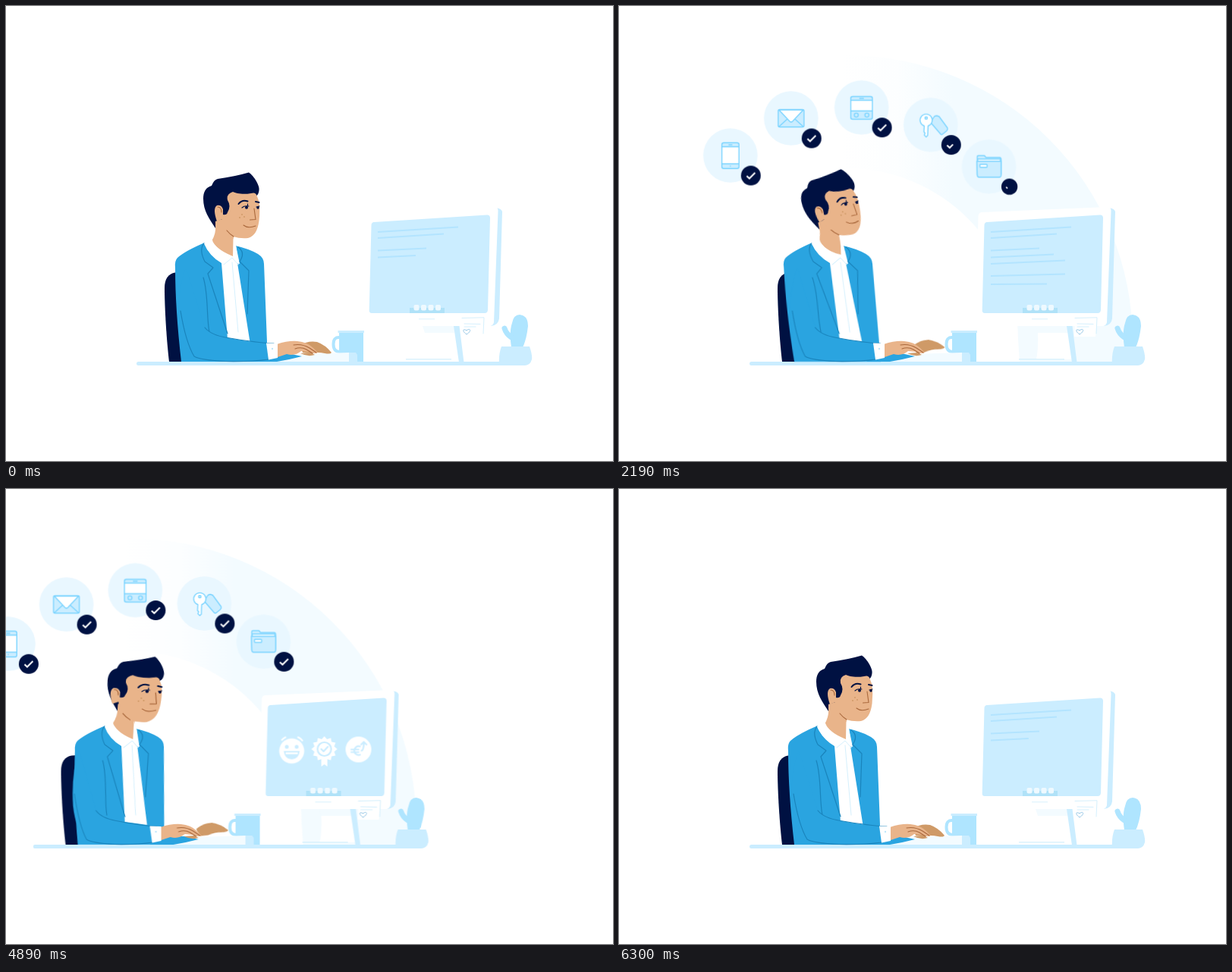
An HTML page that plays this animation: 800x600 px, repeating every 6330 ms.

```html
<!DOCTYPE html>
<html lang="en">
<head>
<meta charset="utf-8">
<title>At the desk</title>
<style>
html, body { margin: 0; width: 100%; height: 100%; overflow: hidden; background: #fff; }
svg { display: block; width: 800px; height: 600px; }

.navy { fill: #001142; }
.blue { fill: #2aa4e0; }
.skin { fill: #e9b48a; }
.tan { fill: #cf9a67; }
.pale { fill: #cbedff; }
.sky { fill: #afe5ff; }
.mist { fill: #f3fbff; }
.white { fill: #fff; }
.seam, .crease, .brow, .text path, .thin, .cut { fill: none; stroke-linecap: round; stroke-linejoin: round; }
.seam { stroke: #1a84bc; stroke-width: 1.2; }
.crease { stroke: #a9683c; stroke-width: 1.1; }
.brow { stroke: #001142; stroke-width: 2; }
.thin { stroke: #d5f0fd; stroke-width: 1; }
.cut { stroke: #cbedff; stroke-width: 2.2; }
.glyph { fill: #cbedff; stroke: #7dd5ff; stroke-width: 1.4; stroke-linejoin: round; }
.glyph .white { fill: #fff; }

/* every loop below lasts one full cycle */
.track, .arc, .torso, .head, .face, .sleeve, .hand, .far, .text, .text .new, .text .half, .badge, .tick, .pop {
  animation: 6330ms linear infinite both;
}
.track { animation-name: slide; }
.arc { opacity: 0; animation-name: arc; }
.torso { transform-origin: 0 469px; animation-name: lean; animation-timing-function: ease-in-out; }
.head { transform-origin: 285px 318px; animation-name: nod; animation-timing-function: ease-in-out; }
.face { transform-origin: 345px 0; animation-name: turn; animation-timing-function: ease-in-out; }
.sleeve { transform-origin: 200px 0; animation-name: sleeve; animation-timing-function: ease-in-out; }
.hand { animation-name: hand; animation-timing-function: ease-in-out; }
.far { transform-origin: 395px 452px; animation-name: far; animation-timing-function: ease-in-out; }
.text { animation-name: clear; }
.text path { stroke: #b3e4ff; stroke-width: 2; stroke-linecap: butt; }
.text .new { stroke-dasharray: 1 2; stroke-dashoffset: 1; animation-name: type; }
.text .half { stroke-dasharray: 1 2; stroke-dashoffset: .4; animation-name: finish; }
.badge { transform: scale(0); animation-name: badge; }
.tick { fill: none; stroke: #fff; stroke-width: 2; stroke-dasharray: 1 2; stroke-dashoffset: 1; animation-name: tick; }
.pop { transform: scale(0); animation-name: pop; }
.still, .still * { animation: none !important; }

@keyframes slide {
  0%, 68.2% { transform: translateX(0); animation-timing-function: cubic-bezier(.65, 0, .35, 1); }
  96.4%, 100% { transform: translateX(-1010px); }
}
@keyframes arc { 0%, 7% { opacity: 0; } 15%, 100% { opacity: 1; } }
@keyframes lean {
  0%, 20.5% { transform: skewX(0deg); }
  31.6%, 37.9% { transform: skewX(2.65deg); }
  47.4%, 100% { transform: skewX(-2deg); }
}
@keyframes nod {
  0% { transform: rotate(0deg); }
  9% { transform: rotate(1.5deg); }
  18.5%, 20.5% { transform: rotate(2.5deg); }
  31.6%, 37.9% { transform: rotate(-9deg); }
  47.4%, 64% { transform: rotate(4deg); }
  77%, 100% { transform: rotate(2.5deg); }
}
@keyframes turn {
  0%, 37.9% { transform: scaleX(1); }
  47.4%, 100% { transform: scaleX(1.14); }
}
@keyframes sleeve {
  0% { transform: scaleX(1); }
  18.5%, 20.5% { transform: scaleX(1.014); }
  31.6%, 37.9% { transform: scaleX(.945); }
  47.4%, 100% { transform: scaleX(.886); }
}
@keyframes hand {
  0% { transform: translateX(0); }
  18.5%, 20.5% { transform: translateX(2px); }
  31.6%, 37.9% { transform: translateX(-8px); }
  47.4%, 100% { transform: translateX(-17px); }
}
@keyframes far {
  0%, 6%, 12% { transform: rotate(0deg); }
  3%, 9%, 15% { transform: rotate(-8deg); }
  18.5% { transform: translateX(-4px) rotate(0deg); }
  24%, 100% { transform: rotate(-12deg); }
}
@keyframes clear { 0%, 37.5% { opacity: 1; } 40%, 100% { opacity: 0; } }
@keyframes type {
  0% { stroke-dashoffset: 1; }
  9.8%, 60% { stroke-dashoffset: 0; }
  60.1%, 100% { stroke-dashoffset: 1; }
}
@keyframes finish { 0% { stroke-dashoffset: .4; } 3.3%, 100% { stroke-dashoffset: 0; } }
@keyframes badge {
  0%, 25.28% { transform: scale(0); animation-timing-function: ease-out; }
  30%, 86% { transform: scale(1); }
  86.1%, 100% { transform: scale(0); }
}
@keyframes tick {
  0%, 27.6% { stroke-dashoffset: 1; }
  30.8%, 86% { stroke-dashoffset: 0; }
  86.1%, 100% { stroke-dashoffset: 1; }
}
@keyframes pop {
  0%, 41% { transform: scale(0); animation-timing-function: cubic-bezier(.3, 1.4, .6, 1); }
  46.5%, 86% { transform: scale(1); }
  86.1%, 100% { transform: scale(0); }
}
</style>
</head>
<body>
<svg viewBox="0 0 800 600">
  <defs>
    <linearGradient id="fade" gradientUnits="userSpaceOnUse" x1="295" y1="0" x2="440" y2="0">
      <stop offset="0" stop-color="#fff"/>
      <stop offset=".5" stop-color="#fcfeff"/>
      <stop offset="1" stop-color="#f3fbff"/>
    </linearGradient>
  </defs>
  <g class="track">
    <g id="scene">
      <path class="arc" fill="url(#fade)" d="M295 65H300A377 377 0 0 1 677 442V469H528L526 440A226 226 0 0 0 300 214H295Z"/>

      <g class="ring">
        <g class="icon">
          <rect x="-11.3" y="-16.8" width="22.6" height="34" rx="2.5"/>
          <path class="white" d="M-11.3 -11.5H11.3V11H-11.3Z"/>
          <path d="M-2.5 -14H2.5M-.6 14H.6"/>
        </g>
        <g class="icon">
          <rect x="-17" y="-11.5" width="34" height="23" rx="2"/>
          <path class="white" d="M-16 -11L-2 4Q0 6 2 4L16 -11Z"/>
          <path fill="none" d="M-16 11L-5 1M16 11L5 1"/>
        </g>
        <g class="icon">
          <rect x="-14.3" y="-14.5" width="28.6" height="30" rx="2.5"/>
          <path class="white" d="M-14.3 -9.5H14.3V4.5H-14.3Z"/>
          <path d="M-3 -12H3"/>
          <circle cx="-7" cy="10" r="2.6"/><circle cx="7" cy="10" r="2.6"/>
        </g>
        <g class="icon">
          <path d="M0 -3L4 -10Q5 -12 8 -12L11 -11L22 4Q23 6 21 8L16 12Q14 14 12 11Z"/>
          <path class="white" d="M-8.5 1.5A8 8 0 1 1 -3.5 1.5L-4 14L-6 16L-8.5 13.5L-7.5 11L-9 9Z"/>
          <circle cx="-6" cy="-9" r="1.6"/>
        </g>
        <g class="icon">
          <path d="M-15.5 11V-13Q-15.5 -14.5 -14 -14.5H-6L-4 -12H14Q16 -12 16 -9V10Z"/>
          <path class="white" d="M-15 -10H15V-6H-15Z"/>
          <path d="M-16 -7H16V11Q16 14 13.5 14H-13Q-15.5 14 -15.5 11Z"/>
          <rect class="white" x="-12" y="-3" width="9.5" height="4" rx="1"/>
        </g>
      </g>

      <!-- monitor, stand and note -->
      <path class="white" d="M552 431H592L597 466H550Q553 450 552 431Z"/>
      <path class="mist" d="M549 422H591V431H552Z"/>
      <path class="pale" d="M590 422H597.5L603.5 470H597Z"/>
      <path d="M527 465.8H587" stroke="#d3effc" stroke-width="1.3"/>
      <path class="pale" d="M645 266Q653 267 654 271L650 412Q649 421 639 422Z"/>
      <path class="white" d="M473.5 277Q474 272.5 478 272L644 265Q649 265 648.5 271L643 417Q642 422 637 422H470Z"/>
      <path class="pale" d="M485 285L634 275.5Q638 275.5 638 279.5L635 401Q634.5 405 631 405H482Q478.5 405 478.7 401L481.5 289Q481.7 285.3 485 285Z"/>
      <path d="M544 412.7H565" stroke="#e4f5fd" stroke-width="1.5"/>
      <path class="white" d="M601 411L630 410.5L628 436H600Z"/>
      <path class="thin" d="M601 411.5L630 410.8L629 432M604 419L625 419.5M604 423H619"/>
      <path d="M607 433C600 428 603 425 607 428C611 424 615 428 607 433Z" fill="none" stroke="#94c6e6"/>
      <path d="M532 398H578V405H532Z" fill="#b0e2f8"/>
      <g fill="#eef9ff">
        <rect x="537.5" y="394" width="7" height="7.5" rx="2"/>
        <rect x="547" y="394" width="7" height="7.5" rx="2"/>
        <rect x="556.5" y="394" width="7" height="7.5" rx="2"/>
        <rect x="566" y="394" width="7" height="7.5" rx="2"/>
      </g>
      <g class="text">
        <path d="M490 298L596 291.5"/>
        <path d="M490 306L577 300.5"/>
        <path d="M490 322.5L554 319.5"/>
        <path class="half" pathLength="1" d="M490 331.5L573 327.5"/>
        <path class="new" pathLength="1" style="animation-delay:209ms" d="M490 340L588 335.5"/>
        <path class="new" pathLength="1" style="animation-delay:829ms" d="M490 356L588 353.5"/>
        <path class="new" pathLength="1" style="animation-delay:1449ms" d="M490 367L564 366.5"/>
      </g>
      <g transform="translate(513 345.5)"><g class="pop">
        <circle class="white" r="16.5"/>
        <path d="M-13.5 -14Q-11 -17 -7.5 -18.5M7.5 -18.5Q12 -17 14.5 -13" fill="none" stroke="#fff" stroke-width="2"/>
        <circle class="pale" cx="-6.5" cy="-5.5" r="2.5"/><circle class="pale" cx="6.5" cy="-5.5" r="2.5"/>
        <path class="pale" d="M-10.5 0H10.5Q9 11 0 11T-10.5 0Z"/>
        <path d="M-8 3H8" stroke="#fff" stroke-width="2.4"/>
      </g></g>
      <g transform="translate(556 343)"><g class="pop" style="animation-delay:250ms">
        <path class="white" d="M-4 12H4V23L0 20L-4 23Z"/>
        <polygon class="white" id="burst"/>
        <circle class="cut" r="9"/>
        <path class="cut" d="M-4 0L-1 3L4.5 -3"/>
      </g></g>
      <g transform="translate(601 343.5)"><g class="pop" style="animation-delay:500ms">
        <circle class="white" r="17"/>
        <path class="cut" d="M2 -4A5.8 5.8 0 1 0 2 7M-9.5 0H0M-9.5 3.5H0M4 1.5Q7 1 7 -9M3.5 -6.5L7 -10L10.5 -6.5"/>
      </g></g>

      <!-- desk and things on it -->
      <path class="pale" d="M174.500 469H690V470L684 474H174.500Q172 474 172 471.500T174.500 469Z"/>
      <path class="sky" d="M666 450Q663 430 667 418Q669 407 677 407Q688 408 688 422Q686 440 681 450Z"/>
      <path d="M657 425Q659 432 666 437" fill="none" stroke="#afe5ff" stroke-width="7" stroke-linecap="round"/>
      <path class="pale" d="M653 449H690Q694 461 693 466Q691 474 683 474H650Q649 459 653 449Z"/>
      <path class="sky" d="M439 430H471V469H439Z"/>
      <path class="pale" d="M437.5 428H472V431H437.5Z"/>
      <path d="M440 437Q431.5 436 431.5 446T440 456" fill="none" stroke="#afe5ff" stroke-width="4"/>
      <path class="pale" d="M452 457H461L463 460V469H452Z"/>
      <path class="mist" d="M357 469L388 459L452 457V469Z"/>

      <!-- person -->
      <path class="navy" d="M232 469H215C212 445 209 400 209 372Q209 354 223 351.5L232 351Z"/>
      <path class="blue" d="M340 458H372L390 462Q375 466 357 469H326Z"/>
      <g class="torso">
        <path class="blue" d="M262 312Q236 323 226 332Q222 336 223 345Q223 400 231 469H345L340 340Q340 332 332 327Q320 320 302 316Z"/>
        <path class="white" d="M261 313L272 303L298 326L303 316L308 340L305 339L321.5 443L292 439L284 339Q268 330 261 313Z"/>
        <path class="seam" d="M261 313Q254 321 262 337L273 345L266 353L292 432M306 318Q316 325 308 337L320 349L318 406M260 358C267 380 264 410 268 430"/>
        <g class="head">
          <path class="navy" d="M276 293C268 281 260 270 260 254Q260 240 271 237Q274 229 279 228Q301 225 320 219.5C327 224 335 238 333.5 243Q333 248 330.5 250L300 265L288 285Z"/>
          <path class="skin" d="M276 284L288 280L306 300L300 304V331Q282 325 271 310Q277 300 276 290Z"/>
          <g class="face">
            <path class="skin" d="M299 245C303 247 312 249 323 247Q329 245 330.5 250L333.5 258Q335 270 333.5 283Q331 303 319 306Q309 307 299 304L287 296L285 281L278 284Q272 267 278 263Q284 262 286 268V275Q291 276 292 272Q297 264 292 256Q290 248 299 245Z"/>
            <path class="crease" d="M279 265Q284 265 284 272M291 296Q295 301 300 304M327 267L329 281.5L321.5 282M313 289Q319 294 329 290"/>
            <g class="tan"><circle cx="311" cy="275" r="1"/><circle cx="308" cy="279" r="1"/><circle cx="314" cy="278" r="1"/></g>
            <path class="brow" d="M306.5 261Q311 255 318.5 257.5M329 258L333.5 259"/>
            <path class="brow" style="stroke-width:1.1" d="M311 266Q314 263 320 264M318.5 263V261M330 265L334 264"/>
            <circle class="navy" cx="317" cy="265.7" r="2"/><circle class="navy" cx="332" cy="266" r="1.7"/>
          </g>
        </g>
        <path class="white" d="M261 313L271.5 304Q270 318 299 330L299.5 306L303 316L307 341L298 332L287 340Q268 330 261 313Z"/>
        <path class="thin" d="M287 341L298 332L306 341M298 338L306 430"/>
      </g>
      <g class="sleeve">
        <path class="blue" d="M237 345Q225 375 228 418Q232 450 248 462Q256 467 290 468.5Q320 469 347 466L345 445Q320 443 292 437.5Q268 433 262 424Z"/>
        <path class="seam" d="M230 402Q237 444 248 462Q256 467 290 468.5Q325 469 346 466M262 424Q270 434 292 437.5Q330 444 353 445"/>
      </g>
      <path class="tan far" d="M388 447Q398 441 410 443Q421 447 429 457Q428 459.5 420 458Q411 456 402 458L391 457Z"/>
      <g class="hand">
        <path class="tan" d="M388 458L402 457L407 460Q398 463 388 458Z"/>
        <path class="skin" d="M357 446Q372 441 384 442Q397 443 405 451L411 457Q407 459.5 400 456L389 455Q381 462 370 459L358 463Z"/>
        <path class="crease" d="M379 447Q390 445 400 451L409 457M381 452Q389 449 396 453L404 458"/>
        <path class="white" d="M343 444.5L358 445L358 464L346 466.5Z"/>
        <circle cx="351" cy="452" r="1.2" fill="#bfe6fa"/>
      </g>
    </g>
  </g>
</svg>
<script>
const scene = document.getElementById('scene');
const icons = [...scene.querySelectorAll('.icon')];
const LOOP = 6330;

icons.forEach((icon, i) => {
  const wait = `style="animation-delay:${i * 100}ms"`;
  icon.innerHTML = `<circle r="35.8" fill="#e9f7ff"/><g class="glyph">${icon.innerHTML}</g>
    <g transform="translate(27 26.5)"><g class="badge" ${wait}><circle class="navy" r="13"/>
    <path class="tick" ${wait} pathLength="1" d="M-5.5 .5L-2 3.8L5.5 -3.8"/></g></g>`;
});

const burst = document.getElementById('burst');
burst.setAttribute('points', Array.from({ length: 24 }, (_, i) => {
  const a = i * Math.PI / 12, r = i % 2 ? 13.5 : 17;
  return `${r * Math.sin(a)},${-r * Math.cos(a)}`;
}).join(' '));
burst.removeAttribute('id');

// The next desk waits on the right in its opening pose.
const next = scene.cloneNode(true);
next.removeAttribute('id');
next.classList.add('still');
next.setAttribute('transform', 'translate(1010 0)');
next.querySelector('.ring').remove();
scene.after(next);

// Angles run clockwise from the top; past 57 degrees the path bends in behind the monitor.
function place(icon, i, t) {
  const turn = 150 / (1 + Math.exp((t - 1201) / (242 + 7 * i)));
  let a = 22.5 * i - 45.4 + turn;
  if (a > 57) a = Math.min(80, 57 + (a - 57) * .64);
  const r = 237.5 + .02 * Math.max(0, a - 38) ** 2;
  const rad = a * Math.PI / 180;
  icon.setAttribute('transform', `translate(${308.5 + r * Math.sin(rad)} ${371 - r * Math.cos(rad)})`);
}

let start;
function draw(now) {
  start ??= now;
  const t = (now - start) % LOOP;
  icons.forEach((icon, i) => place(icon, i, t));
  requestAnimationFrame(draw);
}
icons.forEach((icon, i) => place(icon, i, 0));
requestAnimationFrame(draw);
</script>
</body>
</html>
```
